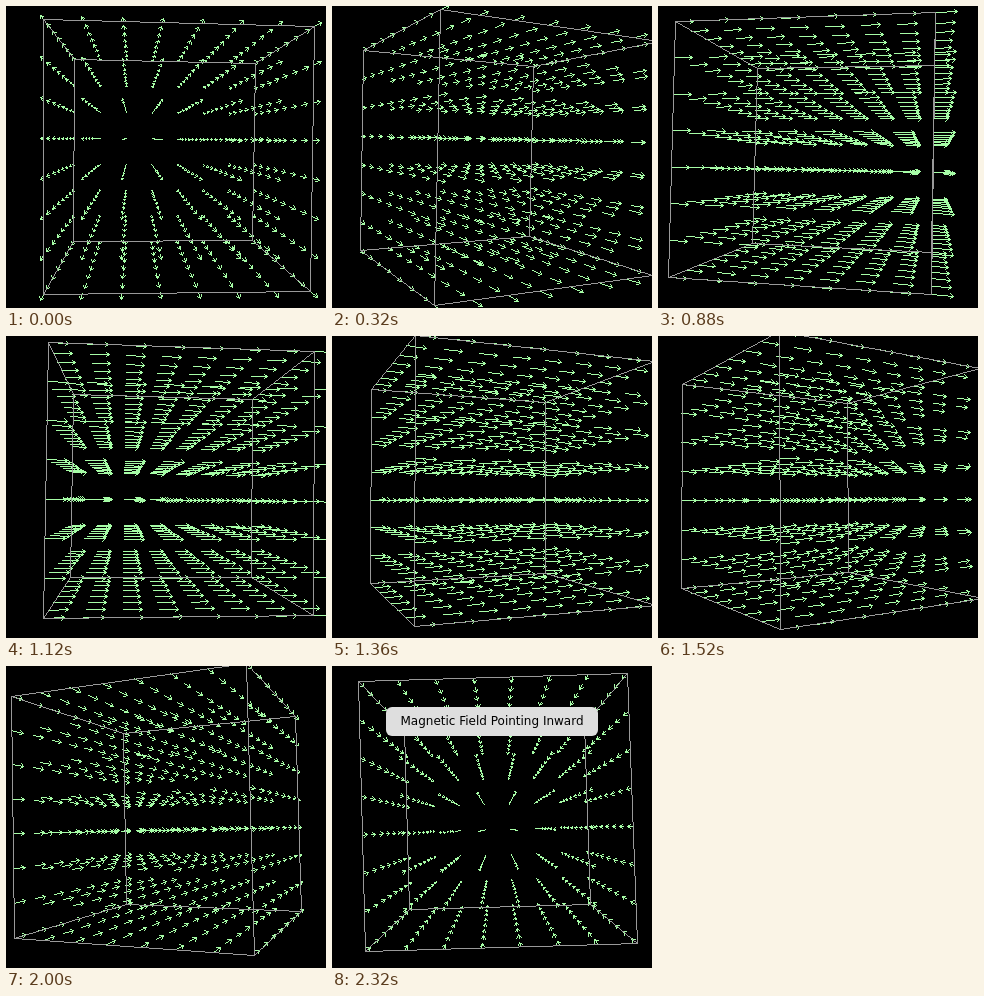
Recreate the animation shown at these times as an HTML page with a canvas. Size 320 by 302 pixels, loop 2.4 s.

```html
<!DOCTYPE html>
<html lang="en">
<head>
<meta charset="utf-8">
<title>Magnetic field</title>
<style>
  html, body { margin: 0; width: 100%; height: 100%; overflow: hidden; background: #000; }
  canvas { position: absolute; left: 0; top: 0; display: block; }
  #label {
    position: absolute; left: 54px; top: 41px; width: 212px; height: 29px;
    border-radius: 6px; background: #dedede; color: #000;
    font: 12px/29px "DejaVu Sans", Verdana, sans-serif;
    text-align: center; white-space: nowrap; visibility: hidden;
  }
</style>
</head>
<body>
<canvas id="stage" width="320" height="302"></canvas>
<div id="label">Magnetic Field Pointing Inward</div>
<script>
const ctx = document.getElementById('stage').getContext('2d');
const label = document.getElementById('label');

const LOOP = 2400, STEP = 80, LABEL_AT = 2080;
const FOCAL = 540, DIST = 5, CX = 164.7, CY = 148.2;
const N = 8, ARROW = 0.15;

// time (ms), yaw, pitch, roll (degrees)
const POSES = [
  [0, 4, 1.8, 0.5],
  [320, 28.5, 1.6, 1.2],
  [640, 60.3, -1.4, 1.8],
  [880, 78.5, -1.5, 1.2],
  [1360, 111.5, -1.5, 0],
  [1760, 140.7, -1.6, -0.8],
  [2320, 180, -1.3, -1.8]
];

function poseAt(t) {
  let i = 0;
  while (i < POSES.length - 2 && t >= POSES[i + 1][0]) i++;
  const a = POSES[i], b = POSES[i + 1];
  const k = Math.min(1, (t - a[0]) / (b[0] - a[0]));
  return [1, 2, 3].map(j => (a[j] + (b[j] - a[j]) * k) * Math.PI / 180);
}

// Returns a function from cube space (c runs along the field) to the screen.
function camera([yaw, pitch, roll]) {
  const sy = Math.sin(yaw), cy = Math.cos(yaw);
  const sp = Math.sin(pitch), cp = Math.cos(pitch);
  const sr = Math.sin(roll), cr = Math.cos(roll);
  return (a, b, c) => {
    const x = a * cy + c * sy, z = c * cy - a * sy;
    const y = b * cp - z * sp;
    const s = FOCAL / (DIST - b * sp - z * cp);
    return [CX + (x * cr + y * sr) * s, CY - (y * cr - x * sr) * s];
  };
}

// Hard-edged line, one pixel wide.
function line(p, q) {
  const [x0, y0, x1, y1] = [...p, ...q].map(Math.round);
  const n = Math.max(Math.abs(x1 - x0), Math.abs(y1 - y0), 1);
  for (let i = 0; i <= n; i++) {
    const x = Math.round(x0 + (x1 - x0) * i / n);
    const y = Math.round(y0 + (y1 - y0) * i / n);
    ctx.fillRect(x, y, 1, 1);
  }
}

function drawBox(project) {
  ctx.fillStyle = '#999';
  for (const u of [-1, 1]) for (const v of [-1, 1]) {
    line(project(-1, u, v), project(1, u, v));
    line(project(u, -1, v), project(u, 1, v));
    line(project(u, v, -1), project(u, v, 1));
  }
}

function drawArrow(tail, tip) {
  const dx = tip[0] - tail[0], dy = tip[1] - tail[1];
  const len = Math.hypot(dx, dy);
  line(tail, tip);
  if (len < 1.2) return;
  const ux = dx / len, uy = dy / len;
  const back = Math.min(3, len * 0.8), side = back * 0.7;
  for (const s of [-side, side]) {
    line(tip, [tip[0] - ux * back - uy * s, tip[1] - uy * back + ux * s]);
  }
}

function drawField(project) {
  const at = i => i * 2 / (N - 1) - 1;
  ctx.fillStyle = '#a6fca6';
  for (let i = 0; i < N; i++)
    for (let j = 0; j < N; j++)
      for (let k = 0; k < N; k++) {
        const a = at(i), b = at(j), c = at(k);
        drawArrow(project(a, b, c), project(a, b, c + ARROW));
      }
}

function draw(t) {
  const project = camera(poseAt(t));
  ctx.fillStyle = '#000';
  ctx.fillRect(0, 0, 320, 302);
  drawField(project);
  drawBox(project);
  label.style.visibility = t >= LABEL_AT ? 'visible' : 'hidden';
}

const start = performance.now();
let shown = -1;

function tick(now) {
  const t = Math.floor((Math.max(0, now - start) % LOOP) / STEP) * STEP;
  if (t !== shown) draw(shown = t);
  requestAnimationFrame(tick);
}

draw(shown = 0);
requestAnimationFrame(tick);
</script>
</body>
</html>
```
